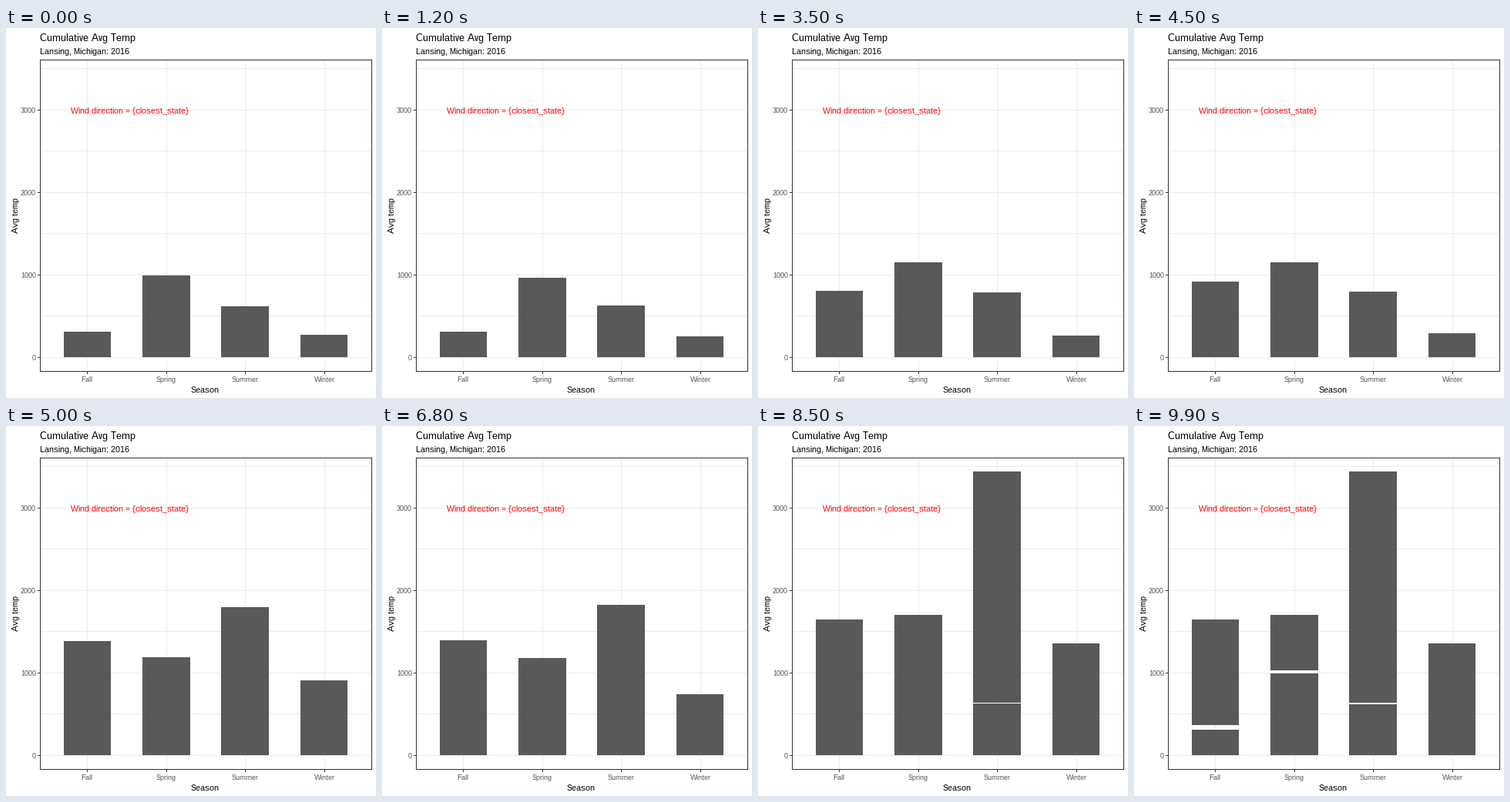
A matplotlib script that plays this animation: 480 px wide and 480 px high, repeating every 10 s.

```python
import matplotlib.pyplot as plt
from matplotlib.animation import FuncAnimation
from matplotlib.patches import Rectangle

SIZE = 480
# Full hinting on whole pixels, kerning scaled down to nothing
plt.rcParams.update({"font.family": "Liberation Sans", "text.hinting": "native",
                     "text.hinting_factor": 1, "text.kerning_factor": 6})

fig = plt.figure(figsize=(SIZE / 72, SIZE / 72), dpi=72, facecolor="white")
ax = fig.add_axes([0, 0, 1, 1])
ax.set(xlim=(0, SIZE), ylim=(SIZE, 0))
ax.axis("off")

GRID, EDGE, TICK, BAR = "#ebebeb", "#333333", "#4d4d4d", "#595959"
LEFT, TOP, RIGHT, BOTTOM = 44, 41, 474, 445
STATES, PER_STATE = 4, 25

# Per season: total shown in each state, and how far it drifts before the next
DATA = {
    "Fall": ((309.8, 797, 1386, 1649), (29.2, 175, 20, -60)),
    "Spring": ((990.3, 1153, 1189, 1705), (-95.3, 0, -15, -41.5)),
    "Summer": ((619.4, 786, 1797, 3443), (46, 22, 45, -15.2)),
    "Winter": ((274.8, 263.6, 906.5, 1359), (-76.3, 40, -295, 0)),
}


def y_at(temp):
    return 427.4 - 0.107 * temp


def box(x0, y0, x1, y1, color, z):
    """Fill whole pixels from (x0, y0) up to, not including, (x1, y1)."""
    return ax.add_patch(Rectangle((x0, y0), x1 - x0, y1 - y0, fc=color,
                                  lw=0, antialiased=False, zorder=z))


def label(x, y, text, size, color="black", ha="left", rotation=0):
    ax.text(x, y, text, size=size, color=color, ha=ha, va="baseline",
            rotation=rotation, rotation_mode="anchor", zorder=5)


class Bar:
    """One season's bar: a moving lower part and a part resting above it."""

    def __init__(self, column, totals, drifts):
        self.totals, self.drifts = totals, drifts
        step = (RIGHT - LEFT) / 4.2
        center = LEFT + step * (column + 0.6)
        x0, x1 = round(center - 0.3 * step), round(center + 0.3 * step)
        self.base = int(y_at(0))
        self.lower = box(x0, self.base, x1, self.base, BAR, 3)
        # The last total rests on the part that drifts back to the first one
        self.seam = totals[0] - drifts[-1]
        self.upper = box(x0, round(y_at(totals[-1])), x1,
                         round(y_at(self.seam)), BAR, 3)

    def show(self, state, p):
        last = state == STATES - 1
        start = self.seam if last else self.totals[state]
        y = round(y_at(start + p * self.drifts[state]))
        self.lower.set_y(y)
        self.lower.set_height(self.base - y)
        self.upper.set_visible(last)


# Grid, ticks and tick labels
for temp in range(0, 4000, 500):
    y = int(y_at(temp))
    box(LEFT, y, RIGHT, y + 1, GRID, 1)
    if temp % 1000 == 0:
        box(LEFT - 3, y, LEFT, y + 1, EDGE, 4)
        label(39, y + 4, str(temp), 9, TICK, "right")

bars = []
for column, (season, (totals, drifts)) in enumerate(DATA.items()):
    x = round(105.4 + 102.4 * column)
    box(x, TOP, x + 1, BOTTOM, GRID, 1)
    box(x, BOTTOM + 1, x + 1, BOTTOM + 4, EDGE, 4)
    label(x, 459, season, 9, TICK, "center")
    bars.append(Bar(column, totals, drifts))

# Panel border
for y in (TOP, BOTTOM):
    box(LEFT, y, RIGHT + 1, y + 1, EDGE, 4)
for x in (LEFT, RIGHT):
    box(x, TOP, x + 1, BOTTOM + 1, EDGE, 4)

label(44, 17, "Cumulative Avg Temp", 13)
label(44, 34, "Lansing, Michigan: 2016", 11)
label(258.5, 473, "Season", 11, ha="center")
label(16, 243, "Avg temp", 11, ha="center", rotation=90)
label(160.5, 111, "Wind direction = {closest_state}", 11, "red", "center")


def update(k):
    """Hold a state for a third of its time, drift linearly, then jump."""
    state, step = divmod(k, PER_STATE)
    hold = 9 if state else 8
    p = max(0, (step - hold) / (PER_STATE - hold))
    for bar in bars:
        bar.show(state, p)
    return []


anim = FuncAnimation(fig, update, frames=STATES * PER_STATE, interval=100,
                     repeat=True, repeat_delay=0, blit=False)
plt.show()
```
